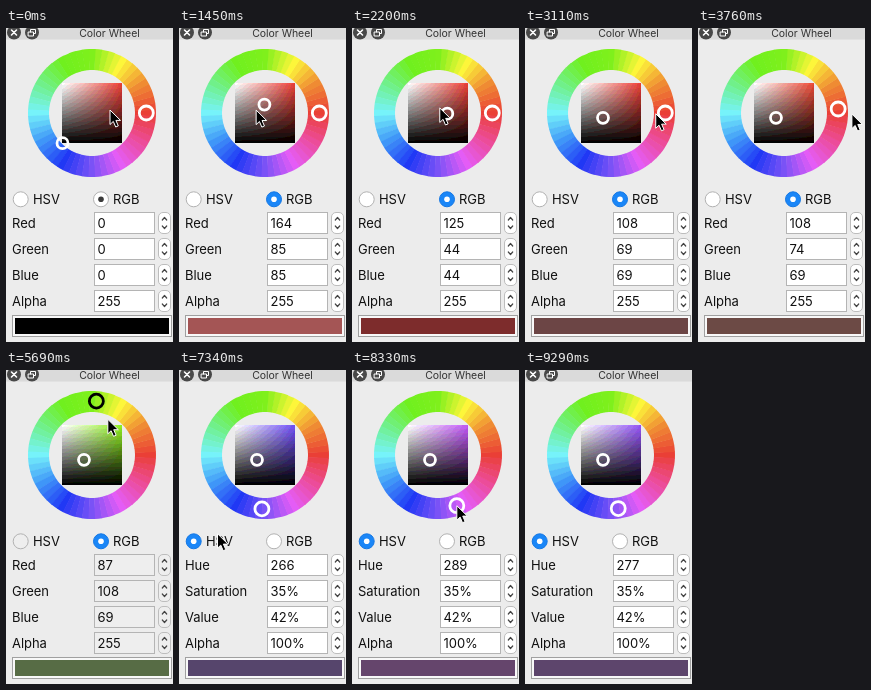
An HTML page with a canvas for the animation above (9570 ms loop, 167 by 314 pixels).

```html
<!DOCTYPE html>
<html lang="en">
<head>
<meta charset="utf-8">
<title>Color Wheel</title>
<style>
  html, body { margin: 0; width: 100%; height: 100%; overflow: hidden; background: #ececec; }
  canvas, svg { position: absolute; left: 0; top: 0; }
  text { font: 13px Inter, "Open Sans", sans-serif; letter-spacing: -.05px; fill: #111; }
  .title { font-size: 10.5px; fill: #333; text-anchor: middle; }
  .line { fill: none; stroke-linecap: round; stroke-linejoin: round; }
</style>
</head>
<body>
<canvas id="view" width="167" height="314"></canvas>
<svg id="ui" width="167" height="314" viewBox="0 0 167 314">
  <rect width="167" height="11.5" fill="#dadada"/>
  <circle cx="8" cy="4.5" r="7" fill="#484848"/>
  <path class="line" d="M5.5 2l5 5m0-5l-5 5" stroke="#fff" stroke-width="1.6"/>
  <circle cx="26" cy="4.5" r="7" fill="#484848"/>
  <path class="line" d="M22.5 4h5v4h-5zM24.5 4v-2.5h5v4h-2" stroke="#fff"/>
  <text class="title" x="103.5" y="9">Color Wheel</text>
  <g id="radios"></g>
  <text x="27" y="176">HSV</text>
  <text x="107" y="176">RGB</text>
  <g id="rows"></g>
  <rect x="6.5" y="287.5" width="159" height="21" fill="#f8f8f8" stroke="#a0a0a0"/>
  <rect id="swatch" x="9" y="290" width="154" height="16"/>
  <circle id="hueMark" r="7" fill="none" stroke-width="2.8"/>
  <circle id="toneMark" r="5.5" fill="none" stroke-width="2.8"/>
  <path id="cursor" d="M0 0V14.5L3.3 11.4L5.7 17L8.3 15.9L5.9 10.4H10.5Z"
    fill="#000" stroke="#fff" stroke-linejoin="round"/>
</svg>
<script>
const LOOP = 9570, CX = 86.3, CY = 85, RING = 54;
const LEFT = 56, TOP = 55, SIDE = 60;
const LEAD = 65, LAG = 26;
const ACTIVE_AT = 990, HSV_AT = 6960;

// Wheel colours every 30 degrees, as they look on the screen
const wheel = "ea3f36 ef8b33 fdf63a 7ff01c 70f01e 70f08a 76f3fa 3f96f8 2038f5 7a52f6 e45cf6 ec4c9a"
  .split(" ").map(hex => [0, 2, 4].map(i => parseInt(hex.slice(i, i + 2), 16) / 255));

// Pointer moves: start, end, x, y
const moves = [
  [90, 390, 91, 87], [990, 2690, 78, 90], [2990, 3150, 140, 85], [3150, 5985, 83, 134],
  [5985, 6230, 41, 245], [6440, 6820, 38, 164], [7310, 7810, 82, 138],
  [8050, 8600, 93, 139], [8600, 8720, 104, 303], [8870, 9270, 152, 313]
];

const $ = id => document.getElementById(id);
const all = name => document.querySelectorAll(name);
const ctx = $("view").getContext("2d");

const mix = (a, b, p) => a + (b - a) * p;
const mixAll = (a, b, p) => a.map((v, i) => mix(v, b[i], p));
const part = (t, from, to) => Math.max(0, Math.min(1, (t - from) / (to - from)));
const ease = p => p * p * (3 - 2 * p);
const bump = (t, from, to) => Math.sin(Math.PI * part(t, from, to));
const wrap = h => ((h % 360) + 360) % 360;

// A nudge up and back, two clockwise sweeps, then a short last drag
function hueAt(t) {
  return 24 * bump(t, 3215, 3794)
    - 222.6 * ease(part(t, 3790, 4760))
    - 231 * part(t, 4900, 6050) ** 4
    + 11 * ease(part(t, 8050, 8600)) + 18 * bump(t, 8050, 8600);
}

// Saturation and value wander through the square
function toneAt(t) {
  if (t < ACTIVE_AT) return [0, 0];
  const q = part(t, 990, 2755);
  return [
    mix(.583, .358, q) + .303 * Math.sin(4 * Math.PI * q),
    mix(.467, .4235, q) + .3 * Math.sin(3 * Math.PI * q)
  ];
}

const tonePoint = ([s, v]) => [LEFT + .5 + SIDE * s, TOP + SIDE * (1 - v) + .2];

function polar(angle, r) {
  const a = angle * Math.PI / 180;
  return [CX + r * Math.cos(a), CY - r * Math.sin(a)];
}

// While dragging, the pointer runs ahead of the marker
function cursorAt(t) {
  if (t >= 990 && t < 2690) return tonePoint(toneAt(t + LEAD));
  if (t >= 3150 && t < 5985) {
    return polar(hueAt(t + LEAD), RING + 35 * bump(t, 3150, 3850) - 22 * bump(t, 4400, 6100));
  }
  if (t >= 8050 && t < 8600) return polar(hueAt(t), RING);
  return moves.reduce((pos, [from, to, x, y]) =>
    mixAll(pos, [x, y], ease(part(t, from, to))), [104, 82]);
}

function hsv(h, s, v) {
  return [5, 3, 1].map(n => {
    const k = (n + wrap(h) / 60) % 6;
    return v * (1 - s * Math.max(0, Math.min(k, 4 - k, 1)));
  });
}

function wheelColor(h) {
  const pos = wrap(h) / 30, i = Math.floor(pos);
  return mixAll(wheel[i % 12], wheel[(i + 1) % 12], pos - i);
}

const css = rgb => `rgb(${rgb.map(c => Math.round(c * 255))})`;
const contrast = ([r, g, b]) => .299 * r + .587 * g + .114 * b > .5 ? "#000" : "#fff";

function drawRing() {
  const count = 60, step = 360 / count, rad = Math.PI / 180;
  ctx.lineWidth = 21;
  for (let i = 0; i < count; i++) {
    ctx.beginPath();
    ctx.arc(86, CY, 53.5, -(i + .54) * step * rad, -(i - .54) * step * rad);
    ctx.strokeStyle = css(wheelColor(i * step));
    ctx.stroke();
  }
}

const tones = ctx.createImageData(SIDE, SIDE);
let shownHue = null;
function drawSquare(hue) {
  if (hue === shownHue) return;
  shownHue = hue;
  const levels = 16, pure = wheelColor(hue);
  for (let y = 0, i = 0; y < SIDE; y++) {
    for (let x = 0; x < SIDE; x++, i += 4) {
      const s = x / (SIDE - 1), v = 1 - y / (SIDE - 1);
      pure.forEach((c, n) => {
        tones.data[i + n] = Math.round(v * mix(1, c, s) * levels) / levels * 255;
      });
      tones.data[i + 3] = 255;
    }
  }
  ctx.putImageData(tones, LEFT, TOP);
}

function buildControls() {
  $("radios").innerHTML = [14.7, 95].map(x =>
    `<circle cx="${x}" cy="171.3" r="7.5"/><circle cx="${x}" cy="171.3" r="2.8"/>`).join("");
  $("rows").innerHTML = [0, 1, 2, 3].map(i => {
    const y = 184 + 26 * i;
    return `<text class="label" x="6" y="${y + 16}"></text>
      <rect class="field" x="88.5" y="${y + .5}" width="60" height="21" stroke="#b4b4b4"/>
      <text class="value" x="91.5" y="${y + 16}"></text>
      <rect class="field" x="152.5" y="${y + .5}" width="12" height="21" rx="4.5" stroke="#bdbdbd"/>
      <path class="line" d="M156.3 ${y + 8}l2.2 -2.5l2.2 2.5m-4.4 6l2.2 2.5l2.2 -2.5"
        stroke="#444" stroke-width="1.2"/>`;
  }).join("");
}

function setRadio(index, on, active, blank) {
  const [disc, dot] = [...$("radios").children].slice(index * 2, index * 2 + 2);
  const lit = on && active;
  disc.setAttribute("fill", lit ? "#1a86f7" : blank);
  disc.setAttribute("stroke", lit ? "#1477e4" : "#b2b2b2");
  dot.setAttribute("fill", !on ? "none" : active ? "#fff" : "#3a3a3a");
}

function setRows(useHsv, h, s, v) {
  const labels = useHsv ? ["Hue", "Saturation", "Value", "Alpha"] : ["Red", "Green", "Blue", "Alpha"];
  const percent = c => Math.floor(c * 100) + "%";
  const values = useHsv
    ? [Math.floor(wrap(h)), percent(s), percent(v), "100%"]
    : [...hsv(h, s, v).map(c => Math.round(c * 255)), 255];
  all(".label").forEach((el, i) => el.textContent = labels[i]);
  all(".value").forEach((el, i) => el.textContent = values[i]);
}

function place(id, [x, y], stroke) {
  $(id).setAttribute("transform", `translate(${x.toFixed(2)} ${y.toFixed(2)})`);
  if (stroke) $(id).setAttribute("stroke", stroke);
}

function render(t) {
  const hue = hueAt(t), lateHue = hueAt(t - LAG);
  const [s, v] = toneAt(t);
  const color = hsv(lateHue, s, v);
  const useHsv = t >= HSV_AT, active = t >= ACTIVE_AT;
  const blank = t >= 3950 && t < 5890 ? "#eee" : "#fff";

  drawSquare(hue);
  setRadio(0, useHsv, active, blank);
  setRadio(1, !useHsv, active, blank);
  setRows(useHsv, lateHue, s, v);
  all(".field").forEach(el => el.setAttribute("fill", blank));
  $("swatch").setAttribute("fill", css(color));
  place("hueMark", polar(hue, RING), contrast(hsv(hue, 1, 1)));
  place("toneMark", tonePoint([s, v]), contrast(color));
  place("cursor", cursorAt(t));
  $("cursor").style.display = t < 9280 ? "" : "none";
}

buildControls();
drawRing();
const start = performance.now();
function tick() {
  render((performance.now() - start) % LOOP);
  requestAnimationFrame(tick);
}
tick();
</script>
</body>
</html>
```
